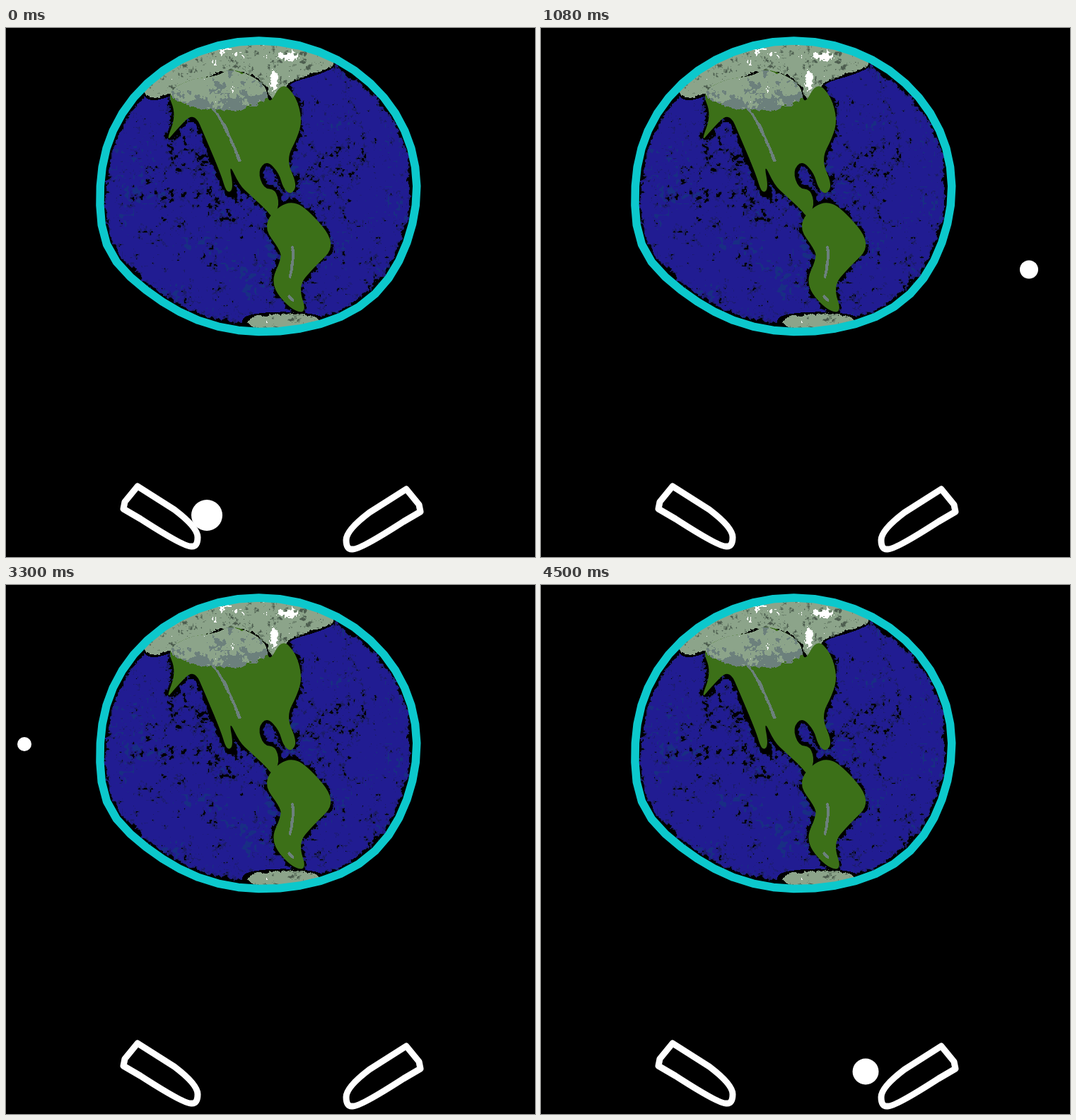
Write an HTML page with a canvas that moves like this. It is 748 px wide and 748 px high and loops after 4.56 s.

```html
<!DOCTYPE html>
<html>
<head>
<meta charset="utf-8">
<title>Planet pinball</title>
<style>
html, body { margin: 0; height: 100%; overflow: hidden; background: #000; }
canvas { display: block; }
</style>
</head>
<body>
<canvas id="stage" width="748" height="748"></canvas>
<script>
const SIZE = 748, LOOP = 4560, STEP = 60;
const ctx = document.getElementById('stage').getContext('2d');

// Closed soft outline: the x,y pairs are controls of quadratic curves between midpoints.
function blob(...p) {
  const path = new Path2D(), n = p.length;
  const at = i => p[i % n];
  const mid = i => (at(i) + at(i + 2)) / 2;
  path.moveTo(mid(0), mid(1));
  for (let i = 2; i <= n; i += 2) path.quadraticCurveTo(at(i), at(i + 1), mid(i), mid(i + 1));
  path.closePath();
  return path;
}

// Ellipse with two swellings, drawn in short straight strokes.
function roundOutline() {
  const path = new Path2D(), sides = 48;
  const swell = (deg, centre, width) => 10 * Math.exp(-(((deg - centre) / width) ** 2));
  for (let i = 0; i < sides; i++) {
    const deg = i * 360 / sides, a = deg * Math.PI / 180;
    const extra = swell(deg, 48, 25) + swell(deg, 155, 17);
    path.lineTo(357.5 + (223 + extra) * Math.cos(a), 223.5 + (205.5 + extra) * Math.sin(a));
  }
  path.closePath();
  return path;
}

const globe = roundOutline();
const north = blob(227,90, 262,72, 300,68, 316,57, 345,66, 368,82, 372,110, 390,76,
  410,96, 419,130, 412,155, 396,186, 412,222, 403,236, 392,227, 386,205, 369,187,
  356,202, 364,227, 381,228, 387,250, 377,269, 368,257, 345,236, 330,222, 315,190,
  322,228, 312,234, 304,207, 282,155, 266,118, 240,145, 226,162, 241,122);
const south = blob(374,262, 400,244, 425,254, 469,306, 434,340, 413,365, 426,404,
  402,398, 373,362, 390,325, 386,312, 366,285);
const seaIce = blob(190,104, 200,40, 340,0, 480,44, 440,64, 396,74, 378,110, 364,66,
  300,58, 240,92);
const ridges = new Path2D('M288 110Q300 120 312 145T331 189M405 308Q408 328 401 354M399 378L407 386');
const flipper = new Path2D('M186 648L238 681Q271 706 271 720T262 733Q252 734 190 694L166 680L168 670Z');

function makeCanvas() {
  const c = document.createElement('canvas');
  c.width = c.height = SIZE;
  return c.getContext('2d');
}

function hash(x, y) {
  const v = Math.sin(x * 127.1 + y * 311.7) * 43758.5453;
  return v - Math.floor(v);
}

function noise(x, y, cell) {
  x = x / cell + cell * 9; y = y / cell;
  const i = Math.floor(x), j = Math.floor(y), u = x - i, v = y - j;
  const top = hash(i, j) * (1 - u) + hash(i + 1, j) * u;
  const low = hash(i, j + 1) * (1 - u) + hash(i + 1, j + 1) * u;
  return top * (1 - v) + low * v;
}

const grain = (x, y) => noise(x, y, 2) * .25 + noise(x, y, 4) * .35 + noise(x, y, 9) * .4;
const near = (x, y, cx, cy, rx, ry) => Math.max(0, 1 - Math.hypot((x - cx) / rx, (y - cy) / ry));

// Paints a blurred grey mask, then turns each pixel's level into a colour.
function texture(target, blur, paint, colour) {
  const g = makeCanvas(), w = 464, h = 430, ox = 126, oy = 8;
  g.filter = `blur(${blur}px)`;
  g.fillStyle = g.strokeStyle = '#fff';
  paint(g);
  const img = g.getImageData(ox, oy, w, h), d = img.data;
  for (let k = 0; k < d.length; k += 4) {
    const i = k / 4, x = ox + i % w, y = oy + Math.floor(i / w);
    const rgb = colour(d[k] / 255 * d[k + 3] / 255, x, y);
    d[k + 3] = rgb ? 255 : 0;
    if (rgb) [d[k], d[k + 1], d[k + 2]] = rgb;
  }
  const out = makeCanvas();
  out.putImageData(img, ox, oy);
  target.drawImage(out.canvas, 0, 0);
}

const BLACK = [0, 0, 0], WHITE = [255, 255, 255], ICE = [140, 164, 138], SLATE = [108, 128, 124];

function oceanMask(g) {
  g.fillStyle = 'rgb(54,54,54)';
  g.fill(globe);
  g.strokeStyle = 'rgb(200,200,200)';
  g.lineWidth = 18;
  g.stroke(globe);
  g.lineWidth = 7;
  g.stroke(north);
  g.stroke(south);
}

function ocean(level, x, y) {
  const n = grain(x, y);
  level += near(x, y, 275, 215, 120, 130) * .17 + near(x, y, 465, 195, 70, 80) * .15;
  if (n < level) return BLACK;
  if (n < level + .07) return [27, 27, 104];
  if (noise(x, y, 4) * .5 + noise(x, y, 34) * .5 > .76) return [24, 46, 132];
  return n < level + .13 ? [30, 28, 126] : [33, 28, 146];
}

function iceMask(g) {
  g.fill(seaIce);
  g.beginPath();
  g.ellipse(392, 415, 57, 10, 0, 0, 7);
  g.fill();
}

function ice(level, x, y) {
  const n = grain(x, y);
  if (n > level * 1.1) return level > .2 ? BLACK : null;
  const bright = near(x, y, 400, 40, 34, 11) + near(x, y, 379, 74, 9, 22)
    + near(x, y, 310, 30, 70, 22) * .3;
  if (n + bright * .6 > .8) return WHITE;
  return n < .3 ? [78, 94, 80] : n < .37 ? [112, 134, 112] : ICE;
}

function snow(level, x, y) {
  const n = grain(x, y);
  if (level < .5 || n > near(x, y, 302, 88, 84, 34) * 3) return null;
  if (n + near(x, y, 315, 82, 40, 12) * .2 > .86) return WHITE;
  return n < .34 + Math.max(0, y - 84) * .011 ? SLATE : ICE;
}

function ridgeMask(g) {
  g.lineWidth = 4;
  g.stroke(ridges);
}

const ridge = (level, x, y) => grain(x, y) < level ? SLATE : null;

function drawPlanet() {
  const g = makeCanvas();
  g.save();
  g.clip(globe);
  texture(g, 3, oceanMask, ocean);
  texture(g, 4, iceMask, ice);
  g.fillStyle = '#3c7018';
  g.fill(north);
  g.fill(south);
  texture(g, 1, m => m.fill(north), snow);
  texture(g, 1, ridgeMask, ridge);
  g.restore();
  g.strokeStyle = '#0cc8cc';
  g.lineWidth = 11.5;
  g.lineJoin = 'round';
  g.stroke(globe);
  return g.canvas;
}

const planet = drawPlanet();

// Ball keys: time, x, y, radius. It is behind the planet between the two flights.
const rising = [[0,284,689,22], [540,533,510,15], [1080,690,341.5,13],
  [1320,725,252,11], [1620,674,163.5,8.3], [2040,564,111,5.5]];
const falling = [[2820,144,138,6.7], [3300,26,225,10], [3480,21,291,12],
  [3840,105.5,454,16], [4080,213,558,16.5], [4380,377,652.5,18], [4500,459,688,18.5]];

// Smooth curve through the keys.
function ballAt(t) {
  const keys = t <= 2040 ? rising : falling, last = keys.length - 1;
  if (t < keys[0][0] || t > keys[last][0]) return null;
  let i = 0;
  while (i < last - 1 && t > keys[i + 1][0]) i++;
  const a = keys[i], b = keys[i + 1], span = b[0] - a[0], u = (t - a[0]) / span;
  const slope = (j, c) => {
    const p = keys[Math.max(0, j - 1)], q = keys[Math.min(last, j + 1)];
    return (q[c] - p[c]) / (q[0] - p[0]) * span;
  };
  return [1, 2, 3].map(c => {
    const m = slope(i, c), n = slope(i + 1, c), d = b[c] - a[c];
    return a[c] + u * (m + u * (3 * d - 2 * m - n + u * (m + n - 2 * d)));
  });
}

function drawFlipper(angle) {
  ctx.translate(182, 668);
  ctx.rotate(angle);
  ctx.translate(-182, -668);
  ctx.stroke(flipper);
}

function frame(now) {
  const t = Math.floor(now % LOOP / STEP) * STEP;
  ctx.fillStyle = '#000';
  ctx.fillRect(0, 0, SIZE, SIZE);
  ctx.drawImage(planet, 0, 0);

  ctx.strokeStyle = ctx.fillStyle = '#fff';
  ctx.lineWidth = 9;
  ctx.lineJoin = 'round';
  ctx.save();
  drawFlipper(-.8 * Math.sin(Math.PI * Math.min(1, t / 360)));
  ctx.restore();
  ctx.save();
  ctx.translate(752, 4);
  ctx.scale(-1, 1);
  drawFlipper(0);
  ctx.restore();

  const ball = ballAt(t);
  if (ball) {
    ctx.beginPath();
    ctx.arc(...ball, 0, 7);
    ctx.fill();
  }
}

const start = performance.now();
function tick() {
  frame(performance.now() - start);
  requestAnimationFrame(tick);
}
tick();
</script>
</body>
</html>
```
